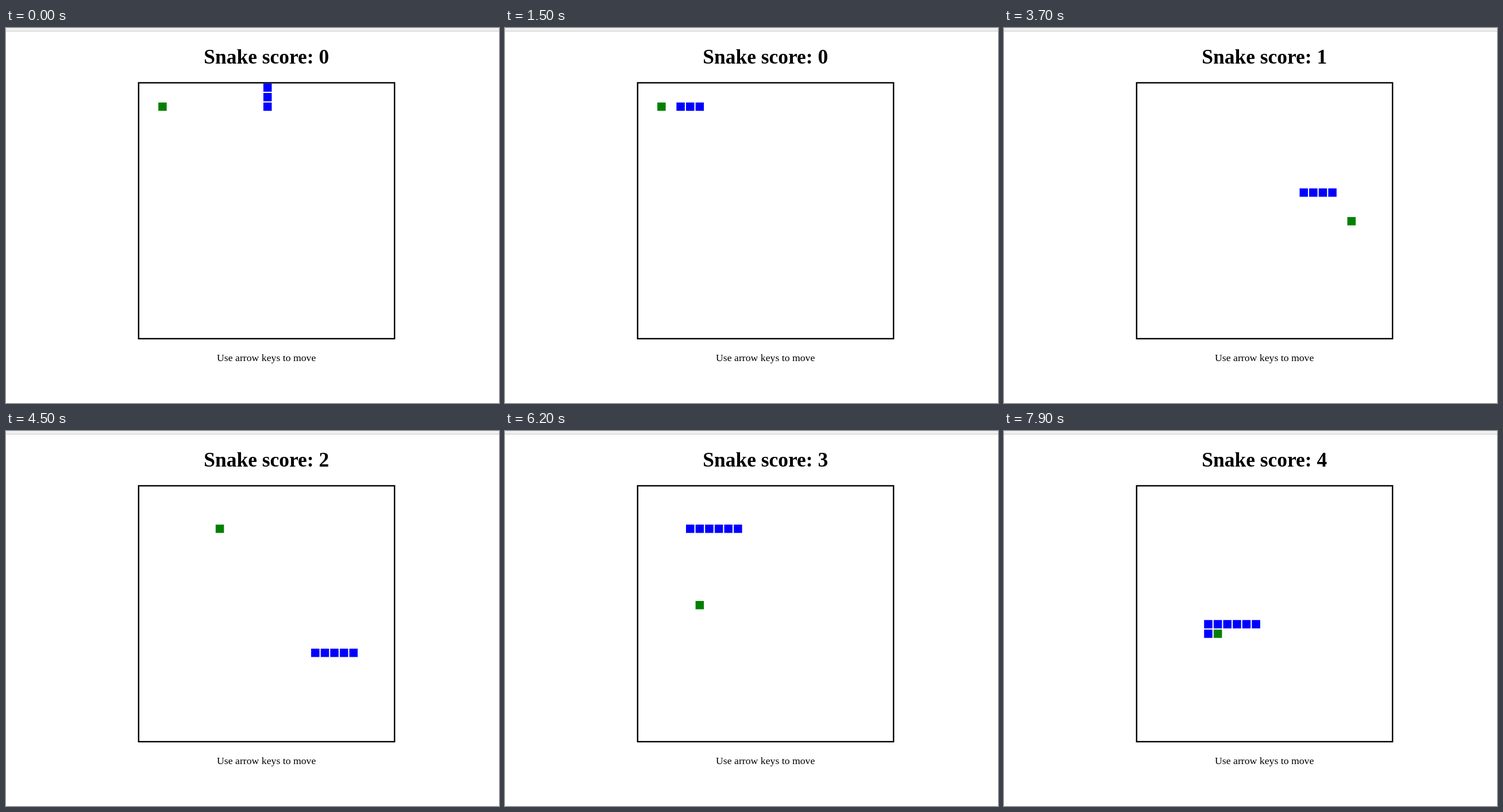
Recreate the animation shown at these times as an HTML page. Size 858x653 px, loop 8000 ms.

```html
<!DOCTYPE html>
<html lang="en">
<head>
<meta charset="utf-8">
<title>Snake</title>
<style>
  html, body { margin: 0; width: 100%; height: 100%; overflow: hidden; background: #fff; }
  svg { display: block; }
  text { font-family: "Liberation Serif", "Times New Roman", serif; text-anchor: middle; }
</style>
</head>
<body>
<svg width="858" height="653" viewBox="0 0 858 653">
  <rect width="858" height="5" fill="#f0f0f0"/>
  <rect y="5" width="858" height="1" fill="#c8c8c8"/>
  <text id="score" x="453.3" y="62" font-size="35.45" font-weight="bold"></text>
  <rect x="230.8" y="95.4" width="445.4" height="445.6" fill="none" stroke="#000" stroke-width="2.4"/>
  <g id="board"></g>
  <text x="453.2" y="580" font-size="17.73">Use arrow keys to move</text>
</svg>
<script>
const LOOP = 8000, FRAME = 100, MOVES_PER_FRAME = 1.5;
const PITCH = 16.62, SIZE = 14.5, LEFT = 231.9, TOP = 96.5;
const START_LENGTH = 3;
const DIRS = { U: [0, -1], D: [0, 1], L: [-1, 0], R: [1, 0] };
const ROUTE = "U11 L13 D9 R22 D6 L5 U12 L3 U1 L9 D8 R8 D2 L6 D1";
const FOODS = [[2, 2], [22, 14], [8, 4], [6, 12], [8, 15]];

// Every cell the head visits, starting from the middle of the board
const path = [[13, 13]];
for (const leg of ROUTE.split(" ")) {
  const [dx, dy] = DIRS[leg[0]];
  for (let i = +leg.slice(1); i > 0; i--) {
    const [x, y] = path[path.length - 1];
    path.push([x + dx, y + dy]);
  }
}

const same = (a, b) => a[0] === b[0] && a[1] === b[1];

// The move on which each food is eaten
const meals = [];
path.forEach((cell, i) => {
  if (same(cell, FOODS[meals.length])) meals.push(i);
});

const board = document.getElementById("board");
const score = document.getElementById("score");

const square = ([x, y], color) =>
  `<rect x="${LEFT + x * PITCH}" y="${TOP + y * PITCH}" width="${SIZE}" height="${SIZE}" fill="${color}"/>`;

function stateAt(move) {
  // The last game ends at the top wall, then the board is briefly empty
  if (move === -2) return { snake: [[13, 0], [13, 1], [13, 2]], food: FOODS[0], points: 0 };
  if (move < 0) return { snake: [], food: null, points: 0 };
  const points = meals.filter(m => m <= move).length;
  const tail = Math.max(0, move + 1 - START_LENGTH - points);
  return { snake: path.slice(tail, move + 1), food: FOODS[points], points };
}

let shown = null;
function draw(now) {
  const frame = Math.floor((now % LOOP) / FRAME);
  const move = Math.floor(frame * MOVES_PER_FRAME - 1.75);
  if (move !== shown) {
    shown = move;
    const { snake, food, points } = stateAt(move);
    score.textContent = "Snake score: " + points;
    board.innerHTML = (food ? square(food, "#008000") : "") +
      snake.map(cell => square(cell, "#00f")).join("");
  }
  requestAnimationFrame(draw);
}
draw(performance.now());
</script>
</body>
</html>
```
